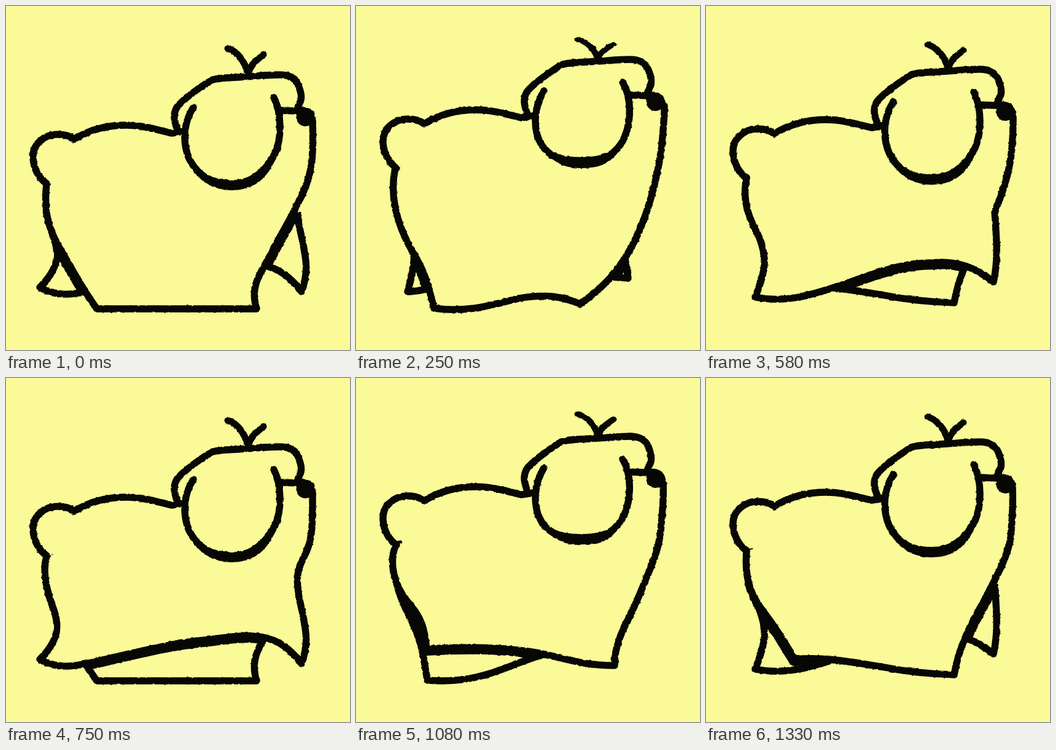
These frames come from a looping animation (560 by 560 pixels, 1410 ms). An HTML page without scripts:

```html
<!DOCTYPE html>
<html lang="en">
<head>
<meta charset="utf-8">
<title>Walking creature</title>
<style>
  :root { --paper: #fbfa98; --ink: #070705; }
  html, body { margin: 0; width: 100%; height: 100%; overflow: hidden; background: var(--paper); }
  svg { display: block; width: 100%; height: 100%; }
  .ink { fill: none; stroke: var(--ink); stroke-width: 11.4; stroke-linecap: round; stroke-linejoin: round; }
  .near { fill: var(--paper); }
  .shade { stroke-width: 22; }
  .solid { fill: var(--ink); stroke-width: 8; }
  .upper { transform: translateY(var(--y)); }
  .tuft { stroke-width: 11; transform-origin: 393px 112px; transform: scaleY(var(--t)); }
  /* each pose takes its turn: 80 or 170 ms out of 1410 */
  .pose { visibility: hidden; animation: brief 1410ms step-end var(--at) infinite; }
  .long { animation-name: long; }
  @keyframes brief { 0% { visibility: visible } 5.6737%, 100% { visibility: hidden } }
  @keyframes long { 0% { visibility: visible } 12.0567%, 100% { visibility: hidden } }
</style>
</head>
<body>
<svg viewBox="0 0 560 560">
  <defs>
    <filter id="rough" filterUnits="userSpaceOnUse" x="0" y="0" width="560" height="560" color-interpolation-filters="sRGB">
      <feTurbulence type="fractalNoise" baseFrequency=".16" numOctaves="2" seed="4"/>
      <feDisplacementMap in="SourceGraphic" scale="3" xChannelSelector="R" yChannelSelector="G"/>
    </filter>

    <!-- outline from tail, over back foot and front foot, to nose -->
    <path id="h0" d="M66,289 C62,330 66,355 85,390 C104,422 125,462 148,493 L408,493 C396,455 415,435 432,402 C445,375 462,350 473,325 C500,278 501,245 499,188"/>
    <path id="h1" d="M66,276 C57,322 68,356 88,395 C108,428 125,460 138,493 C180,494 220,490 262,485 C310,481 340,482 388,490 C400,462 420,435 440,398 C470,345 490,290 497,245 C500,215 501,200 501,175"/>
    <path id="h2" d="M64,263 C54,310 66,355 92,400 C112,432 118,455 127,492 C185,500 225,485 265,476 C310,468 335,473 365,485 C400,460 425,435 447,395 C475,345 490,280 497,235 C500,205 502,185 502,163"/>
    <path id="h3" d="M65,266 C56,312 66,348 88,390 C108,430 110,455 116,492 C175,497 215,484 262,465 C310,446 340,440 360,445 C380,448 395,453 408,458 C425,425 450,385 466,340 C485,290 495,250 500,167"/>
    <path id="h4" d="M66,269 C58,315 66,340 84,378 C104,425 102,450 105,492 C165,496 205,483 258,452 C310,424 330,417 355,415 C400,411 425,418 450,431 C455,380 478,325 489,280 C500,240 501,210 501,171"/>
    <path id="h5" d="M66,279 C58,318 70,345 86,375 C100,410 98,430 80,474 C130,484 170,471 225,453 C300,425 330,418 370,418 C410,414 440,427 468,449 C477,410 472,370 470,335 C495,275 500,240 500,181"/>
    <path id="h6" d="M66,290 C58,320 68,350 78,378 C86,402 88,425 55,458 C80,473 105,471 140,463 C210,447 270,431 330,426 C400,416 442,412 481,465 C494,430 488,410 481,375 C468,320 476,310 488,285 C500,260 499,230 499,188"/>
    <path id="h7" d="M66,279 C55,310 66,345 78,370 C92,400 90,425 70,458 C120,469 180,452 285,438 C350,425 385,426 460,466 C464,425 468,395 473,360 C470,335 482,300 491,270 C499,240 500,215 500,178"/>
    <path id="h8" d="M66,268 C52,300 62,330 76,358 C94,390 93,425 89,457 C160,461 215,443 285,439 C345,435 365,460 438,466 C434,425 455,385 468,345 C485,295 494,275 496,240 C499,205 501,190 500,168"/>
    <path id="h9" d="M65,271 C52,303 64,338 82,362 C108,390 112,410 115,441 C170,438 225,437 280,445 C335,453 360,468 421,468 C420,425 445,395 466,342 C487,292 495,272 497,237 C500,208 501,192 500,172"/>
    <path id="h10" d="M65,275 C52,305 66,345 88,362 C117,381 130,395 140,424 C180,414 225,430 275,450 C325,465 360,473 404,471 C410,430 440,395 463,340 C490,290 495,270 497,235 C500,210 501,195 500,175"/>
    <path id="h11" d="M66,281 C62,330 74,356 97,385 C120,415 130,435 145,458 C190,453 240,463 285,470 C330,479 365,482 404,483 C411,440 430,402 453,362 C470,328 490,295 496,260 C499,225 500,200 499,180"/>
    <!-- far-side variants -->
    <path id="far2" d="M64,263 L95,395 C95,430 88,450 84,465 C110,465 130,455 200,445 L415,441 L443,443 L437,405 L502,163"/>
    <path id="far8" d="M66,268 L118,450 L120,493 L165,494 C210,488 255,470 300,470 C330,470 345,482 375,482 L385,455 L500,170"/>
    <path id="far10" d="M62,275 L85,355 C102,400 103,450 107,491 C165,494 205,483 275,452 L400,432 L455,433 L465,330 L501,175"/>

    <clipPath id="low"><path d="M0,335H560V560H0z"/></clipPath>
    <clipPath id="c0"><use href="#h0"/></clipPath>
    <clipPath id="c1"><use href="#h1"/></clipPath>
    <clipPath id="c3"><use href="#h3"/></clipPath>
    <clipPath id="c5"><use href="#h5"/></clipPath>
    <clipPath id="c6"><use href="#h6"/></clipPath>
    <clipPath id="c7"><use href="#h7"/></clipPath>
    <clipPath id="c9"><use href="#h9"/></clipPath>
    <clipPath id="c10"><use href="#h10"/></clipPath>
    <clipPath id="c11"><use href="#h11"/></clipPath>
    <clipPath id="cf2"><use href="#far2"/></clipPath>
    <clipPath id="cf8"><use href="#far8"/></clipPath>
    <clipPath id="cf10"><use href="#far10"/></clipPath>

    <g id="upper">
      <path d="M66,289 C56,282 45,268 44,247 C43,225 62,209 84,209 C94,209 104,211 111,217 C135,202 163,194 195,194 C222,194 245,201 269,207 L288,204"/>
      <path d="M279,201 C273,185 272,176 278,165 C285,155 310,136 332,122 C342,116 370,117 393,115 C410,114 425,112 445,112 C463,112 471,118 476,129 C480,140 483,150 478,158 L474,167"/>
      <path d="M447,170 L476,171 C490,168 499,174 499,188"/>
      <circle class="solid" cx="487.500" cy="181" r="11"/>
      <path class="tuft" d="M361,69 C375,73 388,88 394,110 C398,97 405,90 419,79"/>
    </g>
    <g id="round">
      <use href="#upper"/>
      <path d="M305,165 C290,188 286,220 298,248 C312,278 340,291 368,291 C398,290 424,268 438,240 C449,215 449,175 436,149"/>
      <path class="solid" d="M302,256 C320,282 345,287 368,287 C395,287 415,275 434,250 C418,285 395,296 368,296 C335,296 315,280 302,256"/>
    </g>
    <g id="flat">
      <use href="#upper"/>
      <path d="M306,163 C292,186 285,222 302,251 C316,272 340,279 365,279 C395,279 416,272 431,250 C449,222 450,175 434,149"/>
      <path class="solid" d="M311,262 C330,274 350,275 368,275 C390,275 410,270 424,260 C408,282 390,285 365,285 C338,285 326,275 311,262"/>
    </g>
  </defs>

  <rect width="560" height="560" fill="var(--paper)"/>
  <g class="ink" filter="url(#rough)">
    <g class="pose" style="--at:0ms;--y:0px;--t:1">
      <g clip-path="url(#low)"><use href="#h6"/></g>
      <use href="#h0" class="shade" clip-path="url(#c6)"/><use href="#h0" class="near"/>
      <use href="#round" class="upper"/>
    </g>
    <g class="pose long" style="--at:80ms;--y:-13px;--t:.88">
      <g clip-path="url(#low)"><use href="#h7"/></g>
      <use href="#h1" class="shade" clip-path="url(#c7)"/><use href="#h1" class="near"/>
      <use href="#round" class="upper"/>
    </g>
    <g class="pose" style="--at:250ms;--y:-25px;--t:.75">
      <g clip-path="url(#low)"><use href="#far2"/></g>
      <use href="#h2" class="shade" clip-path="url(#cf2)"/><use href="#h2" class="near"/>
      <use href="#flat" class="upper"/>
    </g>
    <g class="pose long" style="--at:330ms;--y:-22px;--t:.82">
      <g clip-path="url(#low)"><use href="#h9"/></g>
      <use href="#h3" class="shade" clip-path="url(#c9)"/><use href="#h3" class="near"/>
      <use href="#flat" class="upper"/>
    </g>
    <g class="pose" style="--at:500ms;--y:-18px;--t:.92">
      <g clip-path="url(#low)"><use href="#h10"/></g>
      <use href="#h4" class="shade" clip-path="url(#c10)"/><use href="#h4" class="near"/>
      <use href="#round" class="upper"/>
    </g>
    <g class="pose long" style="--at:580ms;--y:-9px;--t:.93">
      <g clip-path="url(#low)"><use href="#h11"/></g>
      <use href="#h5" class="shade" clip-path="url(#c11)"/><use href="#h5" class="near"/>
      <use href="#round" class="upper"/>
    </g>
    <g class="pose" style="--at:750ms;--y:0px;--t:1">
      <g clip-path="url(#low)"><use href="#h0"/></g>
      <use href="#h6" class="shade" clip-path="url(#c0)"/><use href="#h6" class="near"/>
      <use href="#round" class="upper"/>
    </g>
    <g class="pose" style="--at:830ms;--y:-11px;--t:.86">
      <g clip-path="url(#low)"><use href="#h1"/></g>
      <use href="#h7" class="shade" clip-path="url(#c1)"/><use href="#h7" class="near"/>
      <use href="#round" class="upper"/>
    </g>
    <g class="pose long" style="--at:910ms;--y:-20px;--t:.75">
      <g clip-path="url(#low)"><use href="#far8"/></g>
      <use href="#h8" class="shade" clip-path="url(#cf8)"/><use href="#h8" class="near"/>
      <use href="#flat" class="upper"/>
    </g>
    <g class="pose" style="--at:1080ms;--y:-17px;--t:.84">
      <g clip-path="url(#low)"><use href="#h3"/></g>
      <use href="#h9" class="shade" clip-path="url(#c3)"/><use href="#h9" class="near"/>
      <use href="#flat" class="upper"/>
    </g>
    <g class="pose long" style="--at:1160ms;--y:-14px;--t:.92">
      <g clip-path="url(#low)"><use href="#far10"/></g>
      <use href="#h10" class="shade" clip-path="url(#cf10)"/><use href="#h10" class="near"/>
      <use href="#round" class="upper"/>
    </g>
    <g class="pose" style="--at:1330ms;--y:-8px;--t:.95">
      <g clip-path="url(#low)"><use href="#h5"/></g>
      <use href="#h11" class="shade" clip-path="url(#c5)"/><use href="#h11" class="near"/>
      <use href="#round" class="upper"/>
    </g>
  </g>
</svg>
</body>
</html>
```
